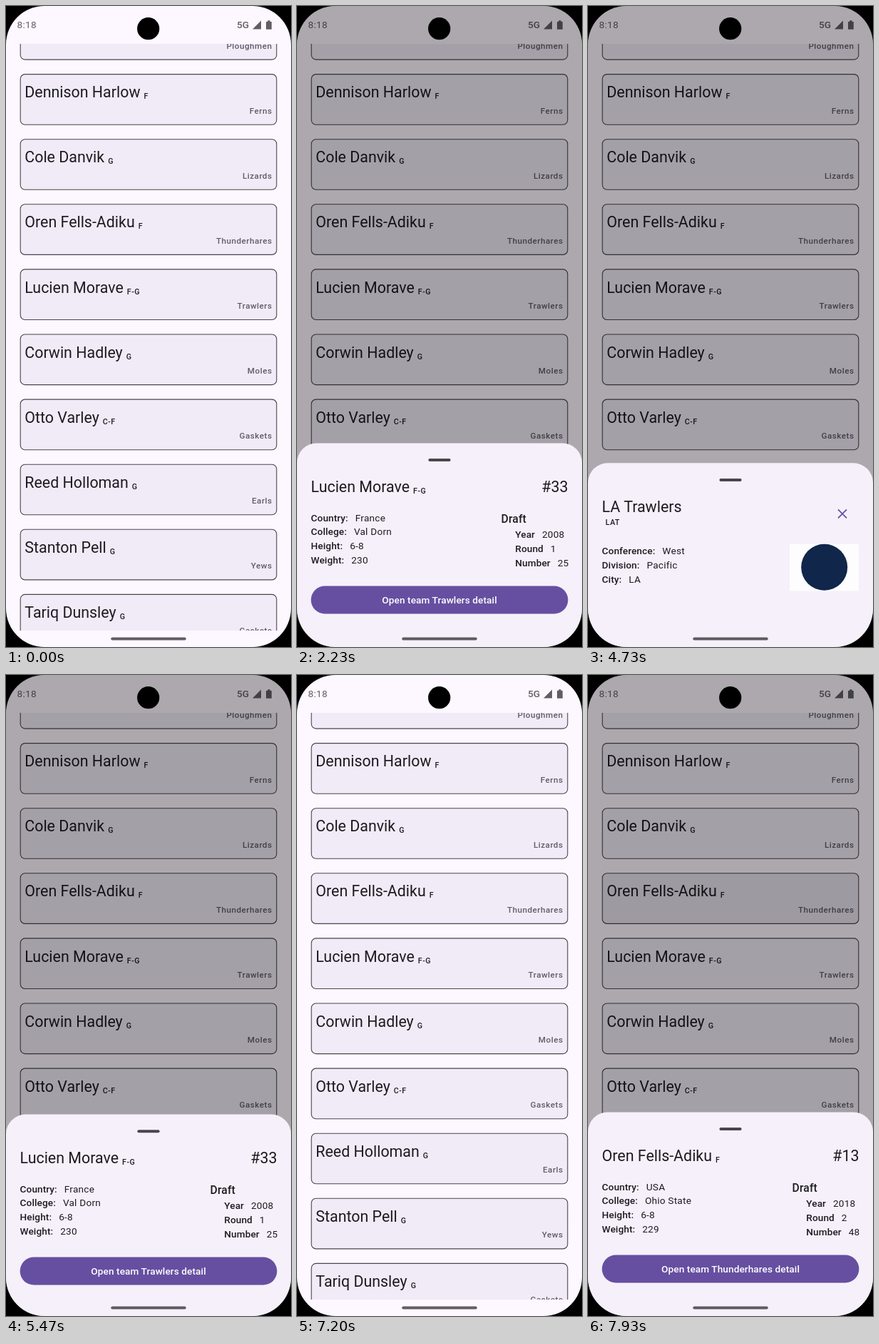
Recreate the animation shown at these times as an HTML page. Size 400 px wide and 898 px high, loop 8 s.

```html
<!DOCTYPE html>
<html lang="en">
<head>
<meta charset="utf-8">
<title>Player list</title>
<style>
html, body { margin: 0; width: 100%; height: 100%; overflow: hidden; background: #000; }
svg { display: block; width: 400px; height: 898px; font-family: Roboto, sans-serif; fill: #1d1b20; }
.title { font-size: 21.4px; }
.small { font-size: 10.7px; font-weight: 500; letter-spacing: .49px; }
.team { font-size: 11.7px; font-weight: 500; letter-spacing: .49px; fill: #615c67; }
.row { font-size: 13.6px; letter-spacing: .24px; }
.label { font-weight: 500; letter-spacing: .1px; }
.draft { font-size: 15.6px; font-weight: 500; letter-spacing: .15px; }
.end { text-anchor: end; }
.mid { text-anchor: middle; }
.system { fill: rgba(0, 0, 0, .62); }
</style>
</head>
<body>
<svg id="stage" viewBox="0 0 400 898"></svg>
<script>
const LOOP = 8000, CLOSED = 898, PLAYER_TOP = 612.5, TEAM_TOP = 640.3;
const CARD_TOP = 95.6, PITCH = 91.1;

const people = [
  ['', '', 'Ploughmen'],
  ['Dennison Harlow', 'F', 'Ferns'],
  ['Cole Danvik', 'G', 'Lizards'],
  ['Oren Fells-Adiku', 'F', 'Thunderhares'],
  ['Lucien Morave', 'F-G', 'Trawlers'],
  ['Corwin Hadley', 'G', 'Moles'],
  ['Otto Varley', 'C-F', 'Gaskets'],
  ['Reed Holloman', 'G', 'Earls'],
  ['Stanton Pell', 'G', 'Yews'],
  ['Tariq Dunsley', 'G', 'Gaskets']
];

const text = (x, y, cls, body) => `<text x="${x}" y="${y}" class="${cls}">${body}</text>`;
const pair = (x, y, label, value) => text(x, y, 'row',
  `<tspan class="label">${label}</tspan><tspan dx="10">${value}</tspan>`);
const named = (x, y, name, pos) => text(x, y, 'title',
  `${name}<tspan class="small" dx="5" dy="2">${pos}</tspan>`);
const rows = (x, y, list) => list.map(([k, v], i) => pair(x, y + i * 19.6, k, v)).join('');
const cardTop = i => CARD_TOP + (i - 1) * PITCH;

function card([name, pos, team], i) {
  const y = cardTop(i);
  return `<rect x="20.2" y="${y}" width="359.6" height="70.6" rx="6.5" fill="#f1ebf7" stroke="#49454f" stroke-width="1.1"/>`
    + named(26.3, y + 32.6, name, pos) + text(373.5, y + 55, 'team end', team);
}

function playerPanel(id, i, number, facts, draft) {
  const [name, pos, team] = people[i];
  return `<g id="${id}">` + named(19.6, 68.8, name, pos) + text(380.5, 68.8, 'title end', number)
    + rows(19.6, 109.2, facts) + text(286.6, 111.7, 'draft', 'Draft') + rows(306.3, 132.8, draft)
    + '<rect x="19.6" y="200" width="360.8" height="39" rx="19.5" fill="#664fa1"/>'
    + `<text x="200" y="224.4" class="row label mid" fill="#fff">Open team ${team} detail</text></g>`;
}

const teamPanel = '<g id="club">' + text(19.6, 68.8, 'title', 'LA Trawlers') + text(24.5, 86.6, 'small', 'LAT')
  + '<path d="M351 65l12 12m0-12l-12 12" stroke="#6750a4" stroke-width="1.8"/>'
  + rows(19.6, 128.2, [['Conference:', 'West'], ['Division:', 'Pacific'], ['City:', 'LA']])
  + '<rect x="283" y="113.5" width="97" height="65.5" fill="#fdfdfe"/>'
  + '<circle cx="331.7" cy="146" r="32.5" fill="#10264a"/></g>';

const stage = document.getElementById('stage');
stage.innerHTML = `
<defs>
  <clipPath id="screen"><rect width="400" height="898" rx="54"/></clipPath>
  <clipPath id="list"><rect y="53" width="400" height="822"/></clipPath>
  <clipPath id="cardClip"><rect id="cardShape" x="20.2" width="359.6" height="70.6" rx="6.5"/></clipPath>
  <radialGradient id="soft"><stop offset=".65"/><stop offset="1" stop-opacity="0"/></radialGradient>
</defs>
<rect width="400" height="898" fill="#000"/>
<g clip-path="url(#screen)">
  <rect width="400" height="898" fill="#fdf7ff"/>
  <g clip-path="url(#list)">${people.map(card).join('')}</g>
  <g clip-path="url(#cardClip)"><circle id="ripple" cx="170" fill="url(#soft)"/></g>
  <rect id="scrim" width="400" height="898" fill="#000"/>
  <g id="sheet">
    <rect width="400" height="400" rx="27.5" fill="#f6f0fa"/>
    <rect x="184.4" y="21.6" width="31.2" height="4" rx="2" fill="#49454f"/>
    ${playerPanel('first', 4, '#33',
      [['Country:', 'France'], ['College:', 'Val Dorn'], ['Height:', '6-8'], ['Weight:', '230']],
      [['Year', '2008'], ['Round', '1'], ['Number', '25']])}
    ${playerPanel('second', 3, '#13',
      [['Country:', 'USA'], ['College:', 'Ohio State'], ['Height:', '6-8'], ['Weight:', '229']],
      [['Year', '2018'], ['Round', '2'], ['Number', '48']])}
    ${teamPanel}
  </g>
  <g class="system">
    ${text(15.6, 31, 'row', '8:18')}
    ${text(324, 31, 'row label', '5G')}
    <path d="M346 32.5L358 20.5V32.5Z"/>
    <path d="M365 22h2.2v-1.8h3.4v1.8h2.2v10.8h-7.8Z"/>
    <rect x="147.3" y="884.5" width="105.4" height="3.9" rx="1.95"/>
  </g>
  <circle cx="199.7" cy="31.7" r="15.6" fill="#000"/>
  <circle id="touch" r="8.5" fill="#fff" fill-opacity=".25" stroke="#000" stroke-opacity=".1"/>
</g>`;

const el = {};
stage.querySelectorAll('[id]').forEach(n => el[n.id] = n);
const set = (node, attrs) => { for (const k in attrs) node.setAttribute(k, attrs[k]); };
const clamp = v => Math.min(1, Math.max(0, v));

// cubic-bezier(.4, 0, .2, 1)
function ease(x) {
  let lo = 0, hi = 1;
  for (let i = 0; i < 20; i++) {
    const s = (lo + hi) / 2, r = 1 - s;
    if (1.2 * r * r * s + .6 * r * s * s + s * s * s < x) lo = s; else hi = s;
  }
  return lo * lo * (3 - 2 * lo);
}
const tween = (t, start) => ease(clamp((t - start) / 300));

// start time, resting top
const slides = [[920, PLAYER_TOP], [2756, TEAM_TOP], [5286, PLAYER_TOP], [6547, CLOSED], [7270, PLAYER_TOP]];
// from, to, x, y
const taps = [[870, 1000, 170, 404], [2600, 2760, 225, 834], [5130, 5300, 357, 711],
  [6470, 6670, 224.5, 366], [7220, 7350, 170, 313]];
// start time, card index
const presses = [[870, 4], [7220, 3]];

function draw(t) {
  let top = CLOSED;
  for (const [start, end] of slides) top += (end - top) * tween(t, start);
  set(el.sheet, { transform: `translate(0 ${top})` });
  set(el.scrim, { opacity: .32 * (tween(t, 938) - tween(t, 6570) + tween(t, 7287)) });

  const panel = t > 6900 ? 'second' : t >= 2720 && t < 5250 ? 'club' : 'first';
  for (const id of ['first', 'second', 'club']) set(el[id], { display: id === panel ? 'inline' : 'none' });

  const [start, index] = presses[t < 7000 ? 0 : 1], age = t - start;
  const fade = age < 300 ? .11 : age < 600 ? .11 - .07 * (age - 300) / 300 : .04 * clamp((1000 - age) / 170);
  set(el.cardShape, { y: cardTop(index) });
  set(el.ripple, {
    cy: cardTop(index) + 35,
    r: Math.max(0, Math.min(340, 40 + age * .8)),
    opacity: age < 0 ? 0 : fade
  });

  const tap = taps.find(([from, to]) => t >= from && t < to);
  set(el.touch, tap ? { cx: tap[2], cy: tap[3], display: 'inline' } : { display: 'none' });
}

const begin = performance.now();
function tick() {
  draw((performance.now() - begin) % LOOP);
  requestAnimationFrame(tick);
}
tick();
</script>
</body>
</html>
```
